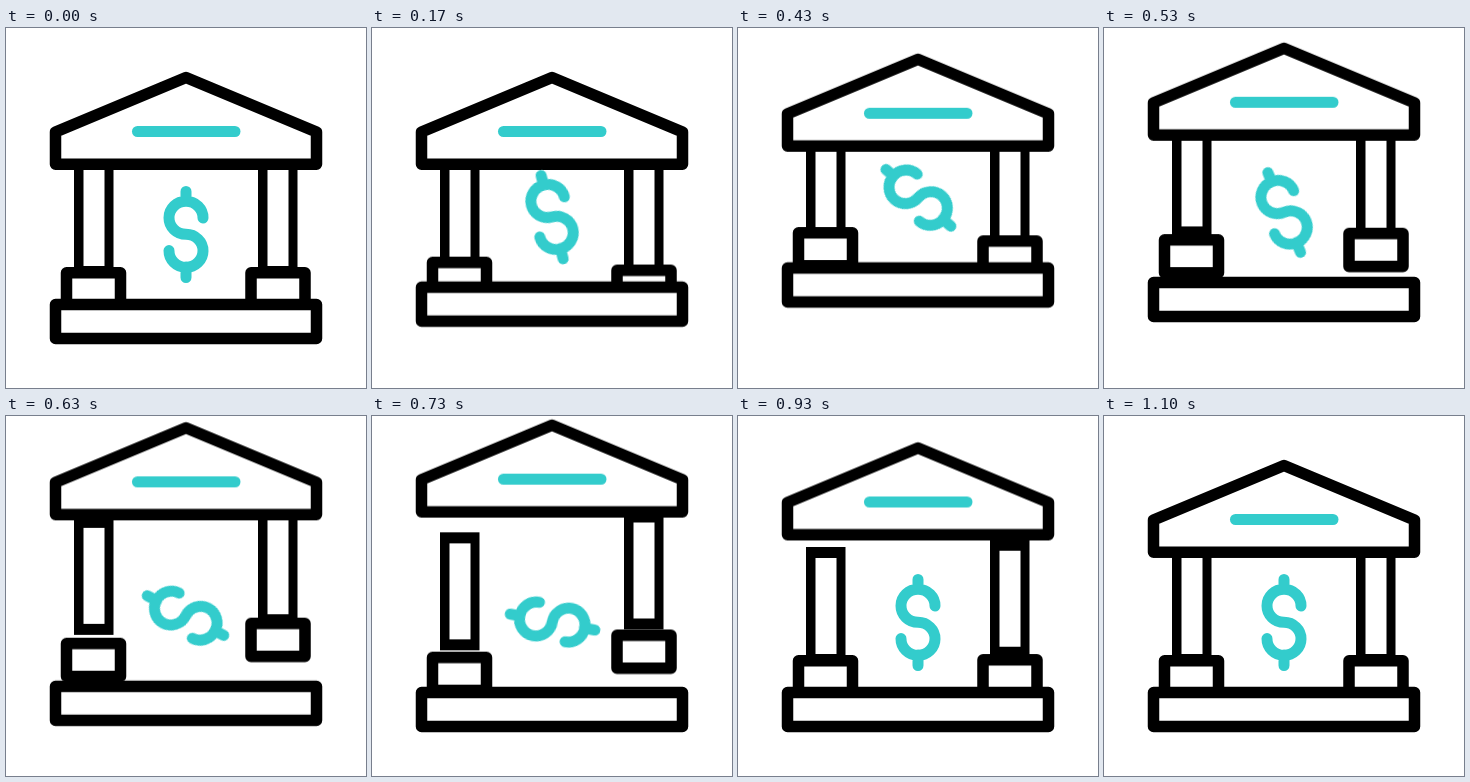
Animation of 360 by 360 pixels, one loop 1.67 s. Source, as an HTML page:

```html
<!DOCTYPE html>
<html lang="en">
<head>
<meta charset="utf-8">
<title>Bank</title>
<style>
  html, body { margin: 0; width: 100%; height: 100%; overflow: hidden; background: #fff; }
  svg { display: block; width: 100vw; height: 100vh; }

  .line { fill: #fff; stroke: #000; stroke-width: 11.5; stroke-linejoin: round; }
  .teal { fill: none; stroke: #33cccc; stroke-width: 11; stroke-linecap: round; }

  .move {
    animation: 1670ms cubic-bezier(.333, 0, .667, 1) infinite;
  }
  .base { animation-name: base; }
  .plinth-l { animation-name: plinth-l; }
  .plinth-r { animation-name: plinth-r; }
  .column-l { animation-name: column-l; }
  .column-r { animation-name: column-r; }
  .roof { animation-name: roof; }
  .spin { animation-name: spin; transform-origin: 180px 206px; }

  /* Each part hops 40px, one after another from the ground up. */
  @keyframes base {
    0%, .4%, 43%, 100% { transform: translateY(0); }
    22% { transform: translateY(-40px); }
  }
  @keyframes plinth-l {
    0%, 2.4%, 47.6%, 100% { transform: translateY(0); }
    26% { transform: translateY(-40px); }
  }
  @keyframes plinth-r {
    0%, 6%, 58%, 100% { transform: translateY(0); }
    34% { transform: translateY(-40px); }
  }
  @keyframes column-l {
    0%, 6%, 53%, 100% { transform: translateY(0); }
    30.5% { transform: translateY(-40px); }
  }
  @keyframes column-r {
    0%, 10%, 62%, 100% { transform: translateY(0); }
    39% { transform: translateY(-40px); }
  }
  @keyframes roof {
    0%, 10.8%, 66.4%, 100% { transform: translateY(0); }
    43% { transform: translateY(-40.5px); }
  }
  /* Wind up, then a full turn. */
  @keyframes spin {
    0% { transform: rotate(0deg); }
    28.4% { transform: rotate(-50deg); }
    49.8%, 100% { transform: rotate(360deg); }
  }
</style>
</head>
<body>
<svg viewBox="0 0 360 360">
  <defs>
    <g id="column">
      <path d="M68 131h39.5v118H68z"/>
      <path fill="#fff" d="M77.5 142h21v96h-21z"/>
    </g>
    <rect id="plinth" class="line" x="60.5" y="244.7" width="54" height="33"/>
  </defs>

  <g class="move column-l"><use href="#column"/></g>
  <g class="move column-r"><use href="#column" x="184"/></g>

  <g class="move roof">
    <path class="line" d="M180 49.5L310.5 104V136.2H49.5V104z"/>
    <path class="teal" d="M131.5 103.5H229"/>
  </g>

  <g class="move plinth-l"><use href="#plinth"/></g>
  <g class="move plinth-r"><use href="#plinth" x="184.5"/></g>

  <g class="move base">
    <rect class="line" x="49.5" y="276.5" width="261" height="34"/>
    <g class="move spin">
      <path class="teal" d="M197 190A17 16.5 0 1 0 180 206.3A17 16.5 0 1 1 163 222.6M180 163.5V173M180 239V249.5"/>
    </g>
  </g>
</svg>
</body>
</html>
```
